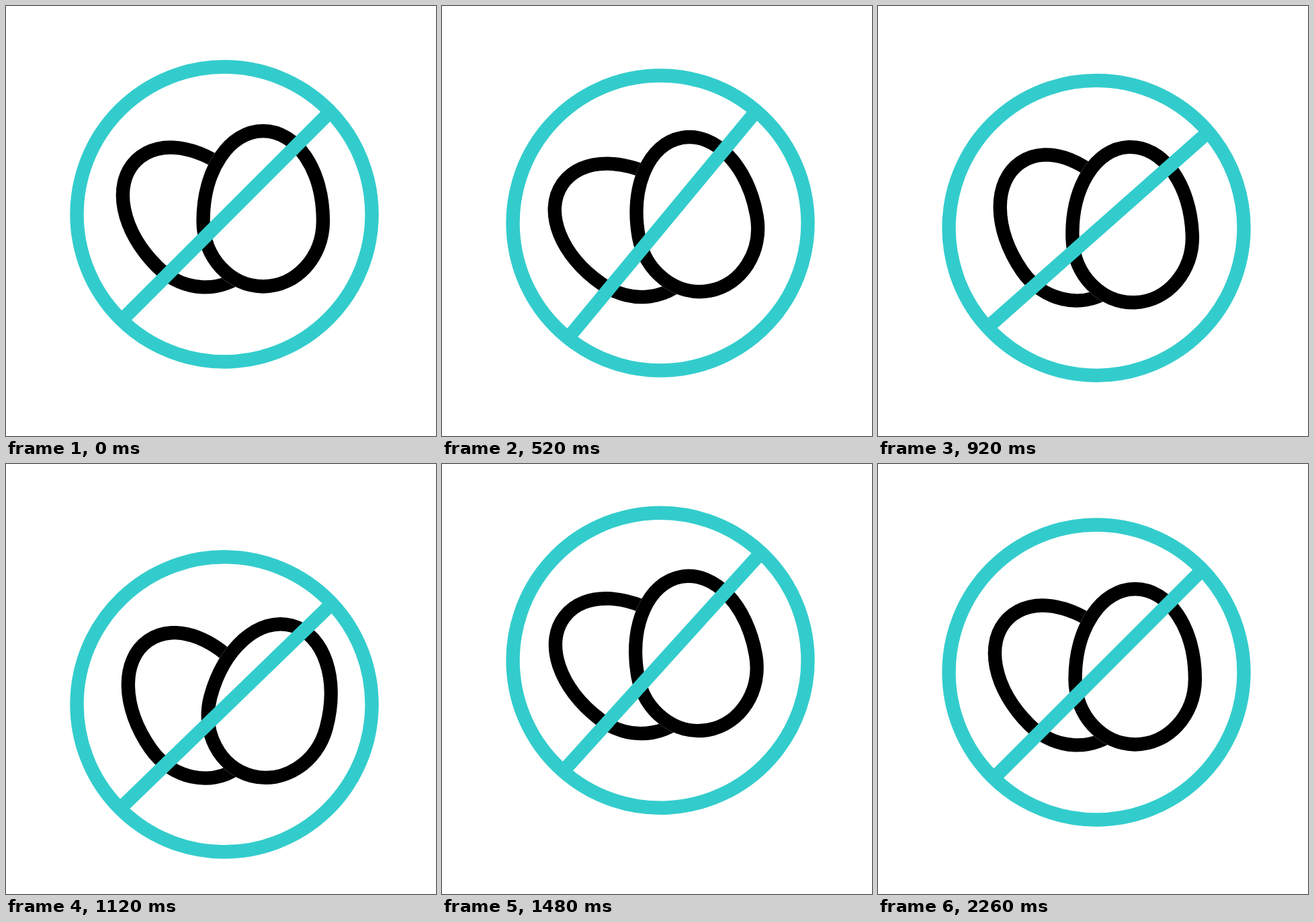
An HTML page for the animation above (2.4 s loop, 640x640 px).

```html
<!DOCTYPE html>
<html lang="en">
<head>
<meta charset="utf-8">
<title>No eggs</title>
<style>
  html, body { margin: 0; width: 100%; height: 100%; overflow: hidden; background: #fff; }
  svg { display: block; width: 100%; height: 100%; }
  path, circle { stroke-width: 20.4; }
  .line { fill: none; stroke: #000; }
  .mask { fill: #fff; stroke: #fff; }
  .sign { fill: none; stroke: #33cccc; }
</style>
</head>
<body>
<svg viewBox="0 0 640 640">
  <defs>
    <path id="egg" d="M0-134C50-134 89.2-76 89.2 0C89.2 54 49 97.5 0 97.5C-49 97.5-89.2 54-89.2 0C-89.2-76-50-134 0-134Z"/>
  </defs>
  <g id="icon">
    <g id="back">
      <use href="#egg" class="line" transform="translate(-36.7 15) rotate(-45)"/>
    </g>
    <g id="front">
      <g transform="translate(57.7 10)">
        <use href="#egg" class="mask"/>
        <use href="#egg" class="line"/>
      </g>
    </g>
    <path class="sign" d="M-152.5 157.5L157.5-152.5"/>
    <circle class="sign" r="219.5"/>
  </g>
</svg>
<script>
const LOOP = 2400, BEAT = 355, LAG = 100;
const [icon, back, front] = ['icon', 'back', 'front'].map(id => document.getElementById(id));

// Rocks from rest through one peak per beat and back to rest
function sway(t, ...peaks) {
  const beat = Math.max(0, t) / BEAT, i = Math.floor(beat);
  const from = peaks[i - 1] || 0, to = peaks[i] || 0;
  return from + (to - from) * (1 - Math.cos(Math.PI * (beat - i))) / 2;
}

function draw(t) {
  const y = 310 + sway(t, 52.5, -36.4, 52, -20.2, 15);
  const tilt = sway(t, -15.7, 7.6, 1.2, -3.3, 3.3);
  const backTilt = sway(t, -11, 2.4, 10, -5.5, 5.7);
  const frontTilt = sway(t - LAG, -4.2, -11.6, 15, -7.7, 2);
  icon.setAttribute('transform', `translate(325 ${y}) rotate(${tilt})`);
  back.setAttribute('transform', `rotate(${backTilt} -40 18)`);
  front.setAttribute('transform', `rotate(${frontTilt} 57.7 43)`);
}

let start = null;
function tick(now) {
  start ??= now;
  draw((now - start) % LOOP);
  requestAnimationFrame(tick);
}
draw(0);
requestAnimationFrame(tick);
</script>
</body>
</html>
```
